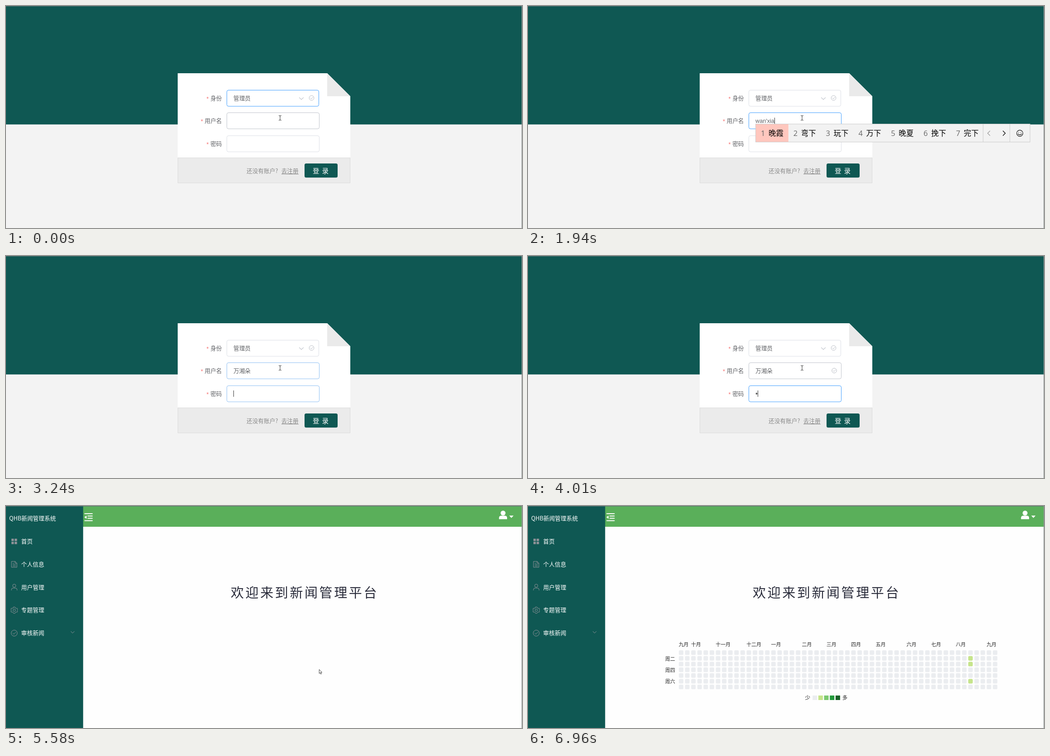
These frames come from a looping animation (1139x492 px, 7840 ms). An HTML page:

```html
<!DOCTYPE html>
<html lang="zh-CN">
<head>
<meta charset="utf-8">
<title>登录</title>
<style>
html, body { margin: 0; width: 100%; height: 100%; overflow: hidden; background: #f3f3f3; }
svg { display: block; position: absolute; left: 0; top: 0; }
text { font-family: "Noto Sans CJK SC", "Noto Sans CJK", sans-serif; font-size: 12.7px; white-space: pre; }
.latin { font-family: "Liberation Sans", Arial, sans-serif; }
.digit { font-family: "Open Sans", sans-serif; font-size: 16.4px; fill: #666; }
.cand { font-size: 16.5px; fill: #000; }
.line { fill: none; stroke-linecap: round; stroke-linejoin: round; }
.small { font-size: 10.9px; fill: #222; }
</style>
</head>
<body>
<svg id="stage" width="1139" height="492" viewBox="0 0 1139 492"></svg>
<script>
const LOOP = 7840;
const TEAL = '#0f5853';
const BORDER = { idle: '#dcdfe6', hover: '#c0c4cc', half: '#8ebff3', focus: '#409eff' };

// Markup helpers
const rect = (x, y, w, h, fill, extra = '') =>
  `<rect x="${x}" y="${y}" width="${w}" height="${h}" fill="${fill}" ${extra}/>`;
const label = (x, y, str, fill, extra = '') => `<text x="${x}" y="${y}" fill="${fill}" ${extra}>${str}</text>`;
const line = (d, color, width = 1, extra = '') =>
  `<path class="line" d="${d}" stroke="${color}" stroke-width="${width}" ${extra}/>`;
const shape = (d, fill, extra = '') => `<path d="${d}" fill="${fill}" ${extra}/>`;
const group = (id, body) => `<g id="${id}">${body}</g>`;

const check = (x, y) =>
  `<circle cx="${x}" cy="${y}" r="5.3" fill="none" stroke="#b9bdc5"/>` +
  line(`M${x - 2.6} ${y}l2 2.1l3.6-3.8`, '#b9bdc5');
const field = (id, y, w) =>
  rect(487.5, y, w, 35.7, '#fff', `id="${id}" rx="3.6" stroke="${BORDER.idle}"`);
const fieldLabel = (x, y, str) =>
  label(x - 8.6, y + 1.5, '*', '#f56c6c', 'class="latin"') + label(x, y, str, '#606266');

function loginPage() {
  return rect(0, 0, 1139, 492, '#f3f3f3') + rect(0, 0, 1139, 262.5, TEAL) +
    shape('M379 149H709L760 200V392H379Z', '#fff') +
    shape('M709 149V200H760Z', '#eaeaea') +
    rect(379.5, 336.5, 380, 55.5, '#ebebeb', 'stroke="#dadada"') +
    fieldLabel(451.2, 208.6, '身份') + fieldLabel(438.5, 258.9, '用户名') + fieldLabel(451.2, 309.6, '密码') +
    field('role', 186.5, 203) + field('user', 236.5, 204) + field('pass', 287.5, 204) +
    label(502, 208.6, '管理员', '#606266') +
    line('M647.5 203l4.5 4.4l4.5-4.4', '#c0c4cc', 1.1) + check(674.5, 203.8) +
    group('userCheck', check(676, 254)) + group('passCheck', check(676, 304.8)) +
    '<text id="userText" x="502" y="258.7" fill="#606266"></text><g id="dots"></g>' +
    rect(0, 0, 1, 14, '#333', 'id="caret"') +
    label(531, 370, '还没有账户?', '#888') +
    label(607.7, 370, '去注册', '#888') + rect(608, 372, 38, 1, '#888') +
    rect(659, 349, 73, 31.3, TEAL, 'rx="3.6"') +
    label('677 697.6', 371.2, '登录', '#fff', 'style="font-size:14.6px;font-weight:500"');
}

function menu() {
  const grey = '#909399';
  const icons = [
    shape('M12 72.5h5.4v5.2h-5.4zM19 72.5h5.4v5.2h-5.4zM12 79.3h5.4v5.2h-5.4zM19 79.3h5.4v5.2h-5.4z', grey),
    line('M12.5 122.8h7.7l3.8 3.8v9.2h-11.5zM20 123v4h4M15.3 127h2M15.3 130h6M15.3 133h6', grey),
    `<circle cx="18.2" cy="176.7" r="3.5" fill="none" stroke="${grey}"/>` +
      line('M12 186.7v-1.2q0-3.6 3.6-3.6h5.2q3.6 0 3.6 3.6v1.2', grey),
    line('M16.4 224h3.6l.7 2l2 .9l2-.4l1 3l-1.5 1.4l1.5 1.4l-1 3l-2-.4l-2 .9l-.7 2h-3.6l-.7-2l-2-.9l-2 .4l-1-3l1.5-1.4l-1.5-1.4l1-3l2 .4l2-.9z', grey) +
      `<circle cx="18.2" cy="230.9" r="2.7" fill="none" stroke="${grey}"/>`,
    `<circle cx="18.2" cy="281.7" r="6.7" fill="none" stroke="${grey}"/>` + line('M15 281.8l2.4 2.4l4.3-4.6', grey)
  ];
  return ['首页', '个人信息', '用户管理', '专题管理', '审核新闻'].map((str, i) =>
    icons[i] + label(33.6, 83 + i * 50.8, str, '#fff')).join('') +
    line('M143.3 278l3.7 3.7l3.7-3.7', grey);
}

function heatmap() {
  const shades = ['#ebedf0', '#c6e48b', '#7bc96f', '#239a3b', '#196127'];
  const colX = c => 333 + c * 13.59;
  const months = { 0: '九月', 2: '十月', 6: '十一月', 11: '十二月', 15: '一月', 20: '二月', 24: '三月',
    28: '四月', 32: '五月', 37: '六月', 41: '七月', 45: '八月', 50: '九月' };
  let out = '';
  for (const c in months) out += label(colX(+c) - .3, 311.4, months[c], '', 'class="small"');
  ['周二', '周四', '周六'].forEach((d, i) => out += label(302.8, 343.4 + i * 24.6, d, '', 'class="small"'));
  for (let c = 0; c < 52; c++) for (let r = 0; r < 7; r++) {
    const active = c === 47 && [1, 2, 5].includes(r);
    out += rect(colX(c), 319.8 + r * 12.68, 10, 10.2, shades[+active], 'rx="2.6"');
  }
  shades.forEach((s, i) => out += rect(628.2 + i * 12.68, 420, 10, 10, s));
  return out + label(611.5, 429.3, '少', '#222', 'style="font-size:11.5px"') +
    label(693.8, 429.3, '多', '#222', 'style="font-size:11.5px"');
}

function homePage() {
  return rect(0, 0, 1139, 492, '#fefefe') + rect(170, 0, 969, 46, '#5aaf5a') + rect(0, 0, 170.3, 492, TEAL) +
    label(7, 31.8, 'QHB新闻管理系统', '#fff') + menu() +
    line('M174 17H190.5M180.7 22.3H190.5M180.7 27.3H190.5M174 32.5H190.5', '#fff', 1.9) +
    shape('M173 24.8l4.8-3.6v7.2z', '#fff') +
    '<circle cx="1097.2" cy="15.6" r="5.4" fill="#fff"/>' +
    shape('M1088.3 29.3v-2.8q0-5 5-5h7.8q5 0 5 5v2.8z', '#fff') +
    shape('M1110.8 21.3h9.6l-4.8 5.2z', '#fff') +
    label(496, 203.4, '欢迎来到新闻管理平台', '#2b2d3c', 'style="font-size:29px;letter-spacing:3.6px"') +
    group('heat', heatmap());
}

function imeBar(x, words) {
  const cellW = w => 38.8 + 16.5 * w.length;
  const end = x + words.reduce((sum, w) => sum + cellW(w), 0);
  let out = rect(x + .5, 261.5, end + 104 - x - 1, 40, '#f2f2f2', 'stroke="#ccc"') +
    rect(x + 1, 262, cellW(words[0]), 39, '#ffc7be');
  let left = x;
  words.forEach((w, i) => {
    out += label(left + 12, 288, i + 1, '', 'class="digit"') + label(left + 29, 288, w, '', 'class="cand"');
    left += cellW(w);
  });
  return out + line(`M${end} 262V301M${end + 59} 262V301`, '#ccc') +
    line(`M${end + 15} 277l-5 5l5 5`, '#999', 1.2) + line(`M${end + 44} 277l5 5l-5 5`, '#111', 1.4) +
    `<circle cx="${end + 81}" cy="282" r="6.8" fill="none" stroke="#111" stroke-width="1.2"/>` +
    line(`M${end + 77.3} 283.5q3.7 4.4 7.4 0M${end + 78.6} 279.8v.4M${end + 83.4} 279.8v.4`, '#111', 1.3);
}

const pointers = {
  ibeam: line('M-2.6-5.2q2.6 0 2.6 1.4q0-1.4 2.6-1.4M0-4V4M-2.6 5.2q2.6 0 2.6-1.4q0 1.4 2.6 1.4', '#444', 1.1),
  hand: shape('M-1 1q0-1.3 1-1.3t1 1.3v3.6l4 .8q1 .3 1 1.5l-.6 3.3l-1 2.8h-4.6l-3.2-4.6q-.4-1.2 1.2-.9l1.2 1.1z',
    '#fff', 'stroke="#222" stroke-width=".8"'),
  arrow: shape('M.3.3V9.2l2-1.9l1.5 3.3l1.5-.7l-1.5-3.2h2.7z', '#fff', 'stroke="#333" stroke-width=".9"')
};

const stage = document.getElementById('stage');
stage.innerHTML = group('login', loginPage()) + group('home', homePage()) +
  rect(0, 0, 1139, 1, '#5c7472') + rect(1138, 0, 1, 492, '#8c9492') +
  '<g id="ime"></g><g id="pointer"></g>';
const $ = id => document.getElementById(id);

// Each row holds [start time, changes]; values stay until changed again.
const NAME = '万湘朵';
const steps = [
  [0, { page: 'login', role: 'focus', user: 'hover', pass: 'idle', text: '', words: '', imeX: 502, dots: 0,
    caret: '', userCheck: 0, passCheck: 0, heat: 0, pointer: 'ibeam', x: 605, y: 248 }],
  [120, { role: 'half', user: 'half', caret: 'user' }],
  [240, { role: 'idle', user: 'focus' }],
  [610, { caret: '' }],
  [1030, { caret: 'user', text: 'wa', words: '哇 瓦 挖 娃 蛙 袜 洼' }],
  [1160, { text: 'wan', words: '万 完 玩 晚 碗 完成 晚上' }],
  [1420, { text: "wan'x", words: '玩笑 万幸 晚些 晚霞 弯下 玩些 完形' }],
  [1540, { text: "wan'xi", words: '玩戏 晚系 万喜 完习 晚溪 万息 玩西' }],
  [1940, { text: "wan'xia", words: '晚霞 弯下 玩下 万下 晚夏 挽下 完下' }],
  [2190, { text: "wan'xian", words: '晚饭 弯线 玩先 万县 晚现 挽弦 完显' }],
  [2310, { text: "wan'xiang", words: '万象 晚香 万项 弯向 玩向 万响 完想' }],
  [2620, { text: "wan'xiang'd", words: NAME + ' 万象灯 万箱单 万项点 晚香袋 万湘 晚香', imeX: 462 }],
  [2990, { text: NAME, words: '' }],
  [3240, { user: 'half', pass: 'half', caret: 'pass' }],
  [3360, { user: 'hover', pass: 'focus', userCheck: 1 }],
  [3750, { caret: '' }],
  [4010, { caret: 'pass', dots: 1 }],
  [4150, { dots: 2 }],
  [4300, { dots: 3 }],
  [4550, { user: 'idle', x: 632, y: 284 }],
  [4670, { pointer: 'hand', x: 684, y: 351 }],
  [4820, { caret: '', x: 688.5, y: 361 }],
  [4970, { pass: 'half', x: 690, y: 361 }],
  [5090, { pass: 'idle', passCheck: 1 }],
  [5580, { page: 'home', pointer: 'arrow', x: 691, y: 362 }],
  [5970, { heat: 1 }],
  [6090, { x: 712, y: 368 }],
  [6210, { x: 775, y: 388 }],
  [6330, { x: 860, y: 415 }],
  [6450, { x: 945, y: 440 }],
  [6570, { x: 1008, y: 458 }],
  [6690, { x: 1032, y: 465 }],
  [6840, { x: 1048, y: 480 }],
  [6960, { pointer: '' }]
];
const states = [];
steps.forEach(([, change], i) => states.push({ ...states[i - 1], ...change }));

const show = (id, on) => $(id).setAttribute('visibility', on ? 'visible' : 'hidden');
const display = (id, on) => { $(id).style.display = on ? '' : 'none'; };

function render(s) {
  display('login', s.page === 'login');
  display('home', s.page === 'home');
  display('heat', s.heat);
  for (const id of ['role', 'user', 'pass']) $(id).setAttribute('stroke', BORDER[s[id]]);
  display('userCheck', s.userCheck);
  display('passCheck', s.passCheck);

  const text = $('userText');
  text.setAttribute('class', /[a-z]/.test(s.text) ? 'latin' : '');
  text.textContent = s.text;
  $('dots').innerHTML = Array.from({ length: s.dots }, (_, i) =>
    `<circle cx="${504.5 + i * 4.4}" cy="305" r="1.9" fill="#555"/>`).join('');

  show('caret', s.caret);
  const inUser = s.caret === 'user';
  const textEnd = s.text ? text.getComputedTextLength() : 0;
  $('caret').setAttribute('x', Math.round(502.3 + (inUser ? textEnd : s.dots * 4.4)));
  $('caret').setAttribute('y', inUser ? 247.5 : 298);

  $('ime').innerHTML = s.words && imeBar(s.imeX, s.words.split(' '));
  $('pointer').innerHTML = pointers[s.pointer] || '';
  $('pointer').setAttribute('transform', `translate(${s.x} ${s.y})`);
}

let current = -1;
function tick() {
  const t = performance.now() % LOOP;
  let i = steps.length - 1;
  while (steps[i][0] > t) i--;
  if (i !== current) render(states[current = i]);
  requestAnimationFrame(tick);
}
tick();
</script>
</body>
</html>
```
